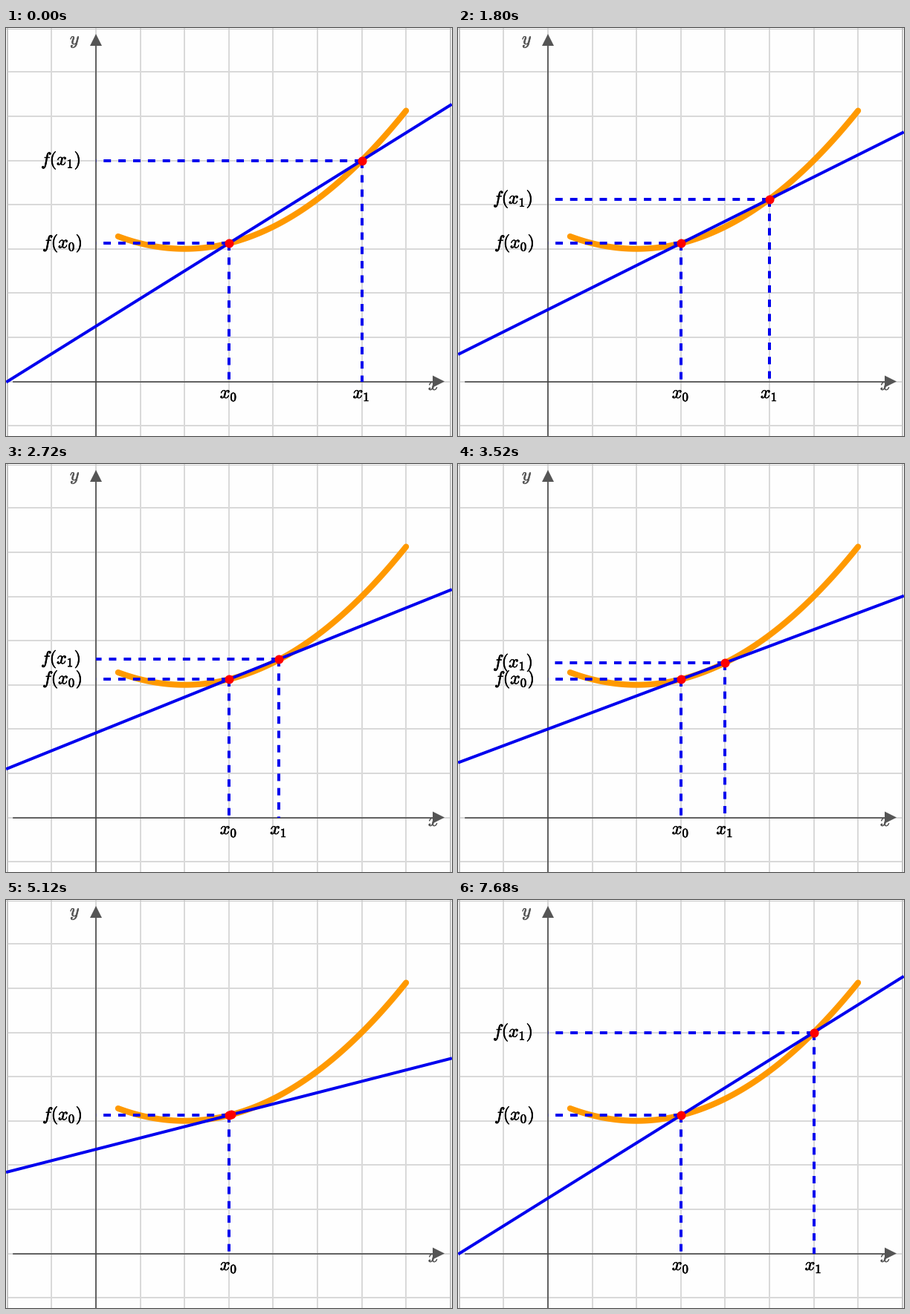
Write a matplotlib script that moves like this. It is 600 px wide and 550 px high and loops after 7720 ms.

```python
import numpy as np
import matplotlib.pyplot as plt
from matplotlib.animation import FuncAnimation
from matplotlib.patches import Polygon
from matplotlib.patheffects import withStroke

W, H, DPI = 600, 550, 100
STEP, FRAMES = 40, 193
PX = 72 / DPI                  # points per pixel
UNIT, OX, OY = 59.6, 121, 476.5
BLUE, GRAY, RED, ORANGE = "#0000ee", "#555555", "#ff0000", "#ff9900"

X0 = 3
STOPS = [6, 5, 4, 3.05]        # resting places of the moving point
START, MOVE, PERIOD = 550, 770, 1500
RESET = 7480

plt.rcParams["mathtext.fontset"] = "cm"
plt.rcParams["lines.scale_dashes"] = False


def f(x):
    return 3 + (x - 2) ** 2 / 8


def sx(x):
    return OX + UNIT * x


def sy(y):
    return OY - UNIT * y


fig = plt.figure(figsize=(W / DPI, H / DPI), dpi=DPI, facecolor="#fefefe")
ax = fig.add_axes([0, 0, 1, 1])
ax.set_xlim(0, W)
ax.set_ylim(H, 0)
ax.axis("off")


def line(xs, ys, color, width, z, **kw):
    return ax.plot(xs, ys, color=color, lw=width * PX, zorder=z, **kw)[0]


def dashed(dash, gap):
    return line([], [], BLUE, 4, 4, linestyle=(0, (dash * PX, gap * PX)))


def label(x, y, s, color="black"):
    return ax.text(x, y, s, size=24 * PX, color=color, ha="left", va="baseline",
                   zorder=7, path_effects=[withStroke(linewidth=0.45, foreground=color)])


def dot():
    return line([], [], RED, 0, 6, marker="o", ms=12 * PX, mew=0)


def guides():
    return dashed(9.93, 9.94), dashed(10, 9.3)


def place(pair, point, x, y):
    """Put a point and its two dashed guides at screen position x, y."""
    across, down = pair
    across.set_data([x, OX], [y, y])
    down.set_data([x, x], [y, OY])
    point.set_data([x], [y])


# grid and frame
for k in range(-1, 8):
    line([sx(k)] * 2, [0, H], "#d9d9d9", 2, 1)
    line([2, 598], [sy(k)] * 2, "#d9d9d9", 2, 1)
for x in (2, 598):
    line([x, x], [0, H], "#c4c4c4", 2, 1)
line([0, W], [0.5, 0.5], "#c8c8c8", 1, 1)
line([0, W], [549.5, 549.5], "#999999", 1, 1)

# axes
line([10, 578], [OY, OY], "#444444", 1.6, 2)
line([OX, OX], [20, H], "#444444", 1.6, 2)
for tip in ([(590, OY), (574, OY - 8), (574, OY + 8)],
            [(OX, 8), (OX - 8, 24), (OX + 8, 24)]):
    ax.add_patch(Polygon(tip, color=GRAY, lw=0, zorder=5))
label(86, 22, "$y$", GRAY)
label(568, 488, "$x$", GRAY)

# curve
cx = np.linspace(0.5, 7, 120)
line(sx(cx), sy(f(cx)), ORANGE, 8, 3, solid_capstyle="round")

# fixed point
AX, AY = sx(X0), sy(f(X0))
place(guides(), dot(), AX, AY)
label(49, AY + 6, "$f(x_0)$")
label(AX - 12, 499, "$x_0$")

# moving point
secant = line([], [], BLUE, 4, 5)
moving, point = guides(), dot()
name_y = label(47, 0, "$f(x_1)$")
name_x = label(0, 499, "$x_1$")


def position(t):
    """Straight steps between the stops, with rests in between."""
    if t >= RESET:
        return STOPS[0], f(STOPS[0])
    times = [START + PERIOD * i + e for i in range(3) for e in (0, MOVE)]
    path = np.array([s for a, b in zip(STOPS, STOPS[1:]) for s in (a, b)])
    return np.interp(t, times, path), np.interp(t, times, f(path))


def update(i):
    t = i * STEP
    x, y = position(t)
    bx, by = sx(x), sy(y)
    place(moving, point, bx, by)
    slope = (by - AY) / (bx - AX)
    ends = np.array([2, 598])
    secant.set_data(ends, AY + slope * (ends - AX))
    name_y.set_y(by + 6)
    name_x.set_x(bx - 12)
    shown = t < START + 2 * PERIOD or t >= RESET
    for part in (*moving, name_y, name_x):
        part.set_visible(shown)
    return *moving, point, secant, name_y, name_x


anim = FuncAnimation(fig, update, frames=FRAMES, interval=STEP,
                     repeat=True, repeat_delay=0, blit=False)
plt.show()
```
